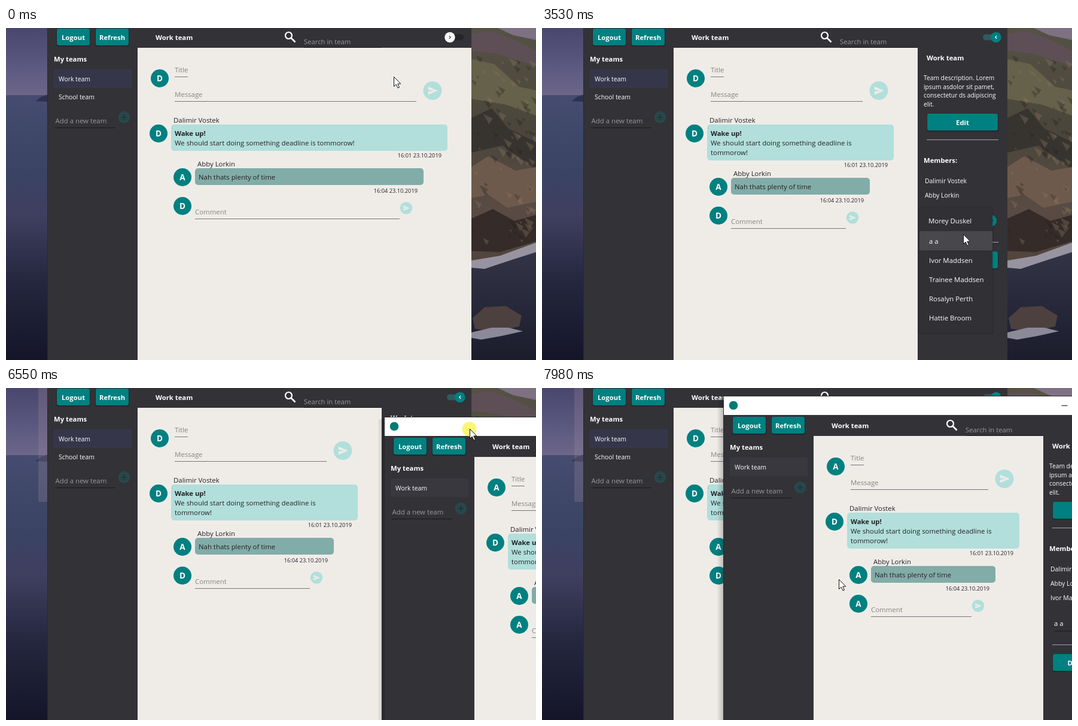
Animation, 886 px wide and 554 px high, one loop 8 s. Source, as an HTML page:

```html
<!DOCTYPE html>
<html lang="en">
<head>
<meta charset="utf-8">
<title>Team chat</title>
<style>
html, body { margin: 0; width: 100%; height: 100%; overflow: hidden; background: #333237; }
#stage { display: block; width: 100vw; height: 100vh; font-family: "Open Sans", "Noto Sans", sans-serif; }
text { white-space: pre; }
</style>
</head>
<body>
<svg id="stage" viewBox="0 0 886 554" preserveAspectRatio="none">
  <defs>
    <linearGradient id="sky" x1="0" y1="0" x2="0" y2="1">
      <stop offset="0" stop-color="#49476d"/><stop offset=".55" stop-color="#5b5880"/><stop offset="1" stop-color="#6d6788"/>
    </linearGradient>
    <linearGradient id="sea" x1="0" y1="0" x2="0" y2="1">
      <stop offset="0" stop-color="#454c70"/><stop offset=".3" stop-color="#3a4363"/><stop offset=".45" stop-color="#403f60"/>
      <stop offset=".7" stop-color="#25273f"/><stop offset="1" stop-color="#141528"/>
    </linearGradient>
    <linearGradient id="cliff" x1="0" y1="0" x2="0" y2="1">
      <stop offset="0" stop-color="#555244"/><stop offset=".3" stop-color="#4a463b"/><stop offset=".55" stop-color="#594b43"/>
      <stop offset="1" stop-color="#443730"/>
    </linearGradient>
    <linearGradient id="bay" x1="0" y1="0" x2="0" y2="1">
      <stop offset="0" stop-color="#343648"/><stop offset="1" stop-color="#1b1d2d"/>
    </linearGradient>
    <linearGradient id="shade"><stop offset="0" stop-opacity="0"/><stop offset="1" stop-opacity=".22"/></linearGradient>
  </defs>
  <g id="photo"></g>
  <g id="scene"></g>
</svg>
<script>
const LOOP = 8000;
const C = { dark: '#333237', page: '#efece8', teal: '#008080', mint: '#b2dfdb', reply: '#82aca8', hint: '#9a999c', ink: '#222226' };
const NAMES = { lead: 'Dalimir Vostek', peer: 'Abby Lorkin', first: 'Morey Duskel', added: 'Ivor Maddsen' };
const CHOICES = ['a a', NAMES.added, 'Trainee Maddsen', 'Rosalyn Perth', 'Hattie Broom'];

// pointer tip: time, x, y
const POINTER = [
  [0, 648, 81], [500, 660, 71], [670, 690, 47], [790, 732, 26], [910, 753, 19],
  [1320, 752, 24], [1440, 747, 44], [1570, 737, 76], [1710, 704, 153], [1970, 706, 178], [2090, 709, 205],
  [2240, 707, 236], [2360, 703, 261], [2620, 700, 284], [2750, 699, 303], [2870, 699, 316],
  [3010, 699, 320], [3530, 704, 344], [3670, 704, 354], [3790, 704, 370], [3920, 704, 387],
  [4180, 708, 380], [4310, 718, 360], [4440, 730, 340], [4570, 738, 328], [4710, 749, 322],
  [5370, 763, 290], [5490, 783, 242], [5630, 800, 226], [5750, 820, 207], [5880, 832, 196],
  [6020, 835, 120], [6150, 836, 37]
];
// dragged window: time, left, top
const DRAG = [
  [6020, 694, 18], [6290, 676, 28], [6410, 650, 41], [6550, 633, 49], [6680, 548, 46], [6800, 445, 40],
  [6940, 415, 37], [7060, 343, 25], [7200, 299, 9], [7320, 304, 14]
];
const RELEASE = [[7590, 446, 34], [7710, 446, 87], [7850, 472, 215], [7980, 496, 319]];
const POPUP = [[0, 0], [3010, .35], [3130, .85], [3270, 1], [4060, .6], [4180, .25], [4310, 0]];
const TOGGLE = [[0, 742, 0], [1180, 742, 18], [1320, 748, 14], [1440, 755, 8], [1570, 759, 0]];

const at = (steps, t) => steps.filter(s => s[0] <= t).pop();
const rect = (x, y, w, h, fill, r = 0, more = '') =>
  `<rect x="${x}" y="${y}" width="${w}" height="${h}" rx="${r}" fill="${fill}" ${more}/>`;
const circle = (x, y, r, fill, more = '') => `<circle cx="${x}" cy="${y}" r="${r}" fill="${fill}" ${more}/>`;
const path = (d, fill, more = '') => `<path d="${d}" fill="${fill}" ${more}/>`;
const group = (x, y, body, more = '') => `<g transform="translate(${x} ${y})" ${more}>${body}</g>`;
const text = (x, y, s, size = 11.4, fill = '#fff', more = '') =>
  `<text x="${x}" y="${y}" font-size="${size}" fill="${fill}" ${more}>${s}</text>`;
const bold = (x, y, s, fill = '#fff', more = '') => text(x, y, s, 11.3, fill, 'font-weight="700" ' + more);
const rule = (x1, x2, y, fill) => rect(x1, y, x2 - x1, 1, fill);

const button = (x, y, w, label) =>
  rect(x - 1, y, w + 2, 30, '#000', 3, 'opacity=".22"') + rect(x, y, w, 28, C.teal, 3) +
  bold(x + w / 2, y + 18.5, label, '#fff', 'text-anchor="middle"');
const avatar = (x, y, letter) =>
  circle(x, y, 15, C.teal) + text(x, y + 5, letter, 13.5, '#fff', 'font-weight="700" text-anchor="middle"');
const plus = (x, y, fill, ink) =>
  circle(x, y, 10, fill) + path(`M${x - 5} ${y}h10M${x} ${y - 5}v10`, 'none', `stroke="${ink}" stroke-width="1.6"`);
const send = (x, y, r) => circle(x, y, r, C.mint) +
  group(x, y, path('M-7.5 -7L9 0L-7.5 7V1.6L3 0L-7.5 -1.6Z', C.page), '') .replace(')"', `) scale(${r / 16})"`);

function photo() {
  let s = rect(0, 0, 70, 113, 'url(#sky)') + rect(0, 112, 70, 442, 'url(#sea)') +
    path('M50 122L58 115L70 111V123Z', '#2e3150') +
    rect(778, 0, 108, 554, 'url(#cliff)') +
    path('M778 0H822L848 12L886 20V0Z', '#7d7183') +
    path('M778 10L808 4L842 16L886 38V64L826 44L778 38Z', '#5d4f55') +
    path('M778 52L816 60L858 98L886 104V146L836 128L778 118Z', '#66614a') +
    path('M778 150L812 134L840 168L886 190V236L830 196L778 208Z', '#37342f') +
    path('M778 232L806 214L852 238L886 232V290L838 300L806 278L778 284Z', '#6e5a4c') +
    path('M778 318L814 302L850 322L886 312V356L826 374L778 372Z', '#352b28') +
    path('M778 392L816 384L852 372L886 362V554H778Z', 'url(#bay)') +
    path('M778 388L826 380L886 358V374L842 388L800 402L778 400Z', '#9793a0') +
    path('M780 484L800 466L836 464L862 480L858 498L820 506L784 502Z', '#4d413f') +
    path('M778 508L812 500L840 500L864 506L828 514L794 520L778 517Z', '#8c8998');
  let seed = 7;
  const rnd = () => (seed = seed * 16807 % 2147483647) / 2147483647;
  for (let i = 0; i < 90; i++) {
    const x = 778 + rnd() * 100, y = 45 + rnd() * 315, w = 4 + rnd() * 12;
    s += path(`M${x} ${y}l${w} ${w * .5}l${-w * .4} ${w * .6}Z`, rnd() < .55 ? '#28231f' : '#8a7660', 'opacity=".35"');
  }
  return s;
}

function sideBar(teams, marked) {
  const y = 30 * teams.length;
  return button(85, 1, 55, 'Logout') + button(150, 1, 55, 'Refresh') + bold(80, 56, 'My teams') +
    rect(80, 69, 130, 31, marked) +
    teams.map((name, i) => text(88, 89 + 30 * i, name, 10.4)).join('') +
    text(82.5, y + 99, 'Add a new team', 11.4, C.hint) + rule(82, 183, y + 106, '#19191b') +
    plus(197.5, y + 89, '#28474b', '#1d3438');
}

function topBar(end) {
  const x = end - 303;
  return bold(250, 20, 'Work team') +
    circle(x - 2.5, 12.5, 5.5, 'none', 'stroke="#fff" stroke-width="2.2"') +
    path(`M${x + 1.5} 16.5l7 7`, 'none', 'stroke="#fff" stroke-width="2.6"') +
    text(end - 280, 27, 'Search in team', 11.3, C.hint) + rule(end - 280, end - 150, 32, '#161618');
}

// r is the right edge of the message area
function messages(r, me) {
  const wrap = r < 700, d = wrap ? 16 : 0, hint = '#858381', line = '#77757a';
  const body = wrap ? ['We should start doing something deadline is', 'tommorow!']
    : ['We should start doing something deadline is tommorow!'];
  const stamp = (x, y, s) => text(x, y, s, 9.25, C.ink, 'text-anchor="end"');
  return avatar(257, 84, me) + text(282, 74, 'Title', 11.4, hint) + rule(282, 304, 81, line) +
    text(282, 115, 'Message', 11.4, hint) + rule(282, r - 92, 122, line) + send(r - 65, 104.5, 15.5) +
    text(280, 158, NAMES.lead, 11.4, C.ink) + avatar(255, 176, 'D') +
    rect(276, 161, r - 316, 44 + d, C.mint, 5) + bold(282, 180, 'Wake up!', C.ink) +
    body.map((s, i) => text(282, 196 + 16 * i, s, 11.4, C.ink)).join('') +
    stamp(r - 50, 216 + d, '16:01 23.10.2019') +
    group(0, d, text(320, 231, NAMES.peer, 11.4, C.ink) + avatar(295, 249, 'A') +
      rect(316, 234, r - 396, 28, C.reply, 5) + text(322, 253, 'Nah thats plenty of time', 11.4, C.ink) +
      stamp(r - 90, 275, '16:04 23.10.2019') + avatar(295, 297, me) +
      text(316, 311, 'Comment', 11.4, hint) + rule(316, r - 120, 318, line) + send(r - 109, 300.5, 10.3));
}

const pickLabel = (y, s) =>
  `<svg x="18" y="${y - 16}" width="74" height="24">${text(0, 16, s)}</svg>`;

function infoPanel(x, members, label, hover) {
  const y = 24 * (members.length - 2);
  const about = ['Team description. Lorem', 'ipsum asdolor sit pamet,', 'consectetur ds adipiscing', 'elit.'];
  return group(x, 0, rect(0, 33, 150, 640, C.dark) + bold(15, 54, 'Work team') +
    about.map((s, i) => text(10, 87 + 14.6 * i, s, 10.25)).join('') +
    button(16, 143, 118, 'Edit') + rule(15, 135, 186, '#a5a4a7') + bold(10, 225, 'Members:') +
    members.map((s, i) => text(12, 259 + 24 * i, s, 10.4)).join('') +
    group(0, y, (hover ? rect(110, 306, 24, 31, '#59585c', 2) : '') + pickLabel(326, label) +
      rule(18, 108, 334, '#1b1b1d') + path('M99 319h8l-4 4.5Z', '#1b1b1d') +
      plus(122, 321.5, C.teal, '#1e3d40') + rule(15, 135, 357, '#a5a4a7') + button(16, 373, 118, 'Delete team')));
}

function toggle(t) {
  const [, x, halo] = at(TOGGLE, t), on = t >= 1180;
  const tip = on ? 'M1.2 -2.4L-1.2 0L1.2 2.4' : 'M-1.2 -2.4L1.2 0L-1.2 2.4';
  return rect(737, 10.5, 28, 10, on ? '#2c5d60' : '#262529', 5) +
    (halo ? circle(x, 15.5, halo, '#5c7f82', 'opacity=".55"') : '') +
    circle(x, 15.5, 8.7, on ? C.teal : '#fafafa') +
    group(x, 15.5, path(tip, 'none', `stroke="${on ? '#fff' : '#444'}" stroke-width="1.3"`));
}

function popup(t, label, pointerY) {
  const alpha = at(POPUP, t)[1];
  if (!alpha) return '';
  const row = Math.floor((pointerY - 339) / 32);
  return `<g opacity="${alpha}">` + rect(629, 298, 126, 213, '#000', 3, 'opacity=".12"') +
    rect(631, 299, 122, 209, '#313035', 1) +
    (row >= 0 ? rect(631, 339 + 32 * row, 122, 32, '#48474b') : '') +
    group(628, 0, pickLabel(326, label)) +
    CHOICES.map((s, i) => text(647, 360 + 32 * i, s)).join('') + '</g>';
}

function mainWindow(t, pointer) {
  const open = t >= 1180, r = open ? 628 : 778;
  const label = t < 4060 ? NAMES.first : t < 4980 ? NAMES.added : 'a a';
  const members = [NAMES.lead, NAMES.peer].concat(t >= 4980 ? NAMES.added : []);
  return rect(69, 0, 709, 554, '#2a292e') + rect(70, 0, 708, 554, C.dark) + rect(220, 33, r - 220, 521, C.page) +
    sideBar(['Work team', 'School team'], '#36364b') + topBar(778) + messages(r, 'D') +
    (open ? infoPanel(r, members, label, t >= 4570 && t < 5370) : '') + toggle(t) + popup(t, label, pointer[2]);
}

function secondWindow(t) {
  const pos = at(DRAG, t);
  if (!pos) return '';
  const [, left, top] = pos, end = 754, r = 604;
  return group(left - 70, top + 33,
    rect(58, -30, 12, 640, 'url(#shade)') + rect(69, -34, 686, 700, '#29282c') +
    rect(70, -33, 684, 31, '#fff') + rect(70, -2, 684, 670, C.dark) + rect(220, 33, r - 220, 640, C.page) +
    circle(86, -18, 7.3, '#007a74') + rule(634.5, 644.5, -18, '#111') +
    sideBar(['Work team'], '#39383e') + topBar(end) + messages(r, 'A') +
    infoPanel(r, [NAMES.lead, NAMES.peer, NAMES.added], 'a a', false),
    t < 6150 ? 'opacity=".5"' : '');
}

function pointerAt(t) {
  if (t >= 7590) return at(RELEASE, t);
  if (t < 6290) return at(POINTER, t);
  const [time, left, top] = at(DRAG, t);
  return [time, left + 142, top + 19];
}

function draw(t) {
  const pointer = pointerAt(t), [, x, y] = pointer;
  const dragging = t >= 6290 && t < 7590;
  return (t >= 6020 ? rect(54, 0, 15, 190, '#a58a9c', 0, 'opacity=".25"') : '') +
    mainWindow(t, pointer) + secondWindow(t) +
    (dragging ? circle(x - .5, y + .5, 12, '#fbf35a', 'opacity=".85"') : '') +
    group(x + .5, y + .5, path('M0 0V16L3.7 12.6L6.5 18.6L9 17.5L6.3 11.6H11.3Z', '#fff', 'stroke="#111"'));
}

const scene = document.getElementById('scene');
let shown = '';
function update(now) {
  const markup = draw(now % LOOP);
  if (markup !== shown) scene.innerHTML = shown = markup;
}
const start = performance.now();
function tick() {
  update(performance.now() - start);
  requestAnimationFrame(tick);
}
document.getElementById('photo').innerHTML = photo();
update(0);
requestAnimationFrame(tick);
</script>
</body>
</html>
```
